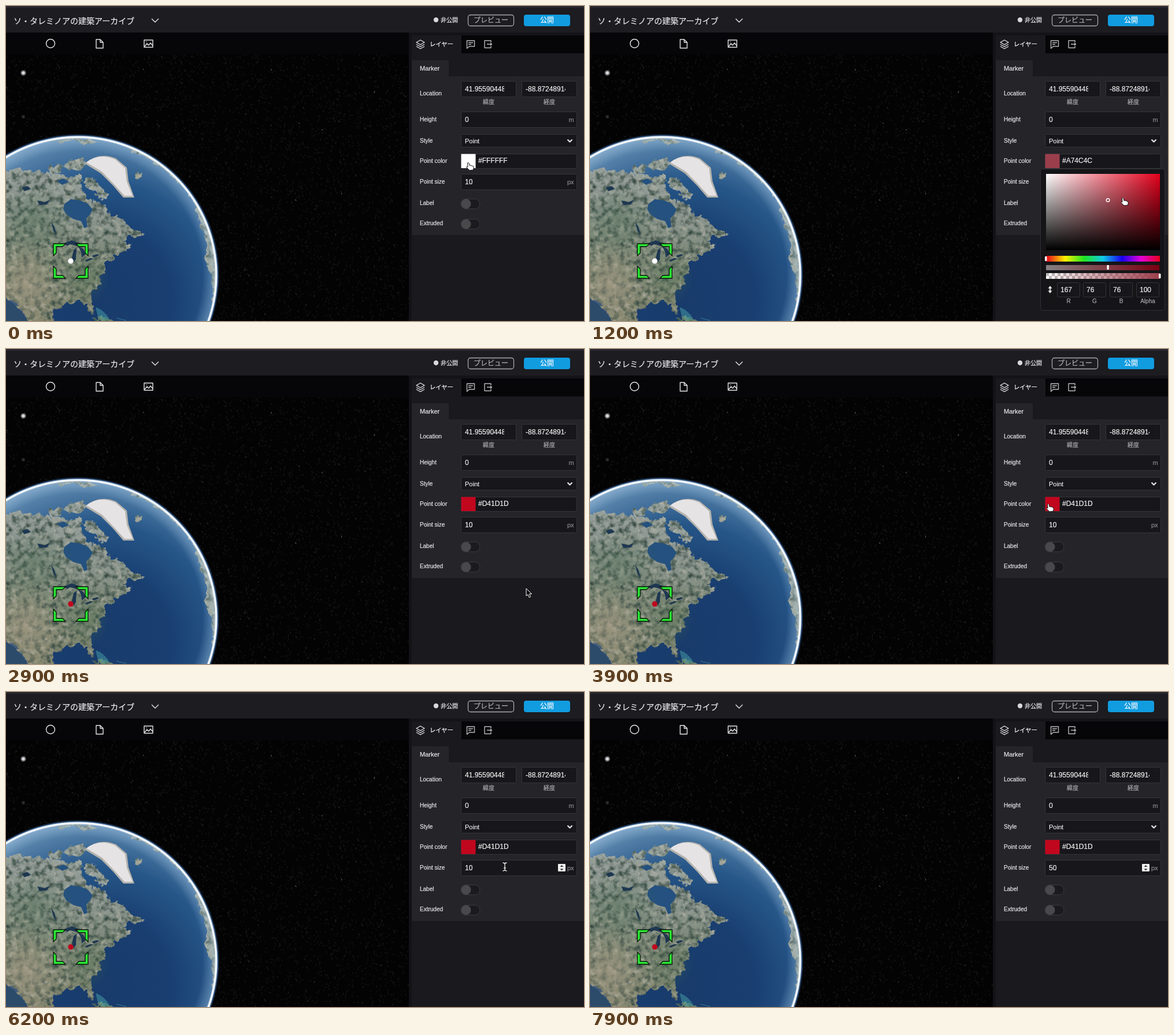
An HTML page for the animation above (8000 ms loop, 1000 by 546 pixels).

```html
<!DOCTYPE html>
<html lang="ja">
<head>
<meta charset="utf-8">
<title>Marker editor</title>
<style>
  html, body { margin: 0; width: 100%; height: 100%; overflow: hidden; background: #000; }
  svg { display: block; width: 100vw; height: 100vh; }
  text { font-family: "Liberation Sans", "Noto Sans CJK JP", "Noto Sans CJK", sans-serif; fill: #f2f2f4; stroke: #f2f2f4; stroke-width: .2; white-space: pre; }
  .line { fill: none; stroke: #e6e6e8; stroke-width: 1.4; stroke-linejoin: round; }
  .field { fill: #17171b; stroke: #34343a; }
  .ink { stroke: #111; stroke-linejoin: round; }
</style>
</head>
<body>
<svg viewBox="0 0 1000 546">
  <defs>
    <radialGradient id="ocean" gradientUnits="userSpaceOnUse" cx="160" cy="510" r="296">
      <stop offset="0" stop-color="#183b6b"/><stop offset=".42" stop-color="#193e70"/>
      <stop offset=".7" stop-color="#265688"/><stop offset="1" stop-color="#6791b5"/>
    </radialGradient>
    <linearGradient id="ground" gradientUnits="userSpaceOnUse" x1="120" y1="270" x2="70" y2="546">
      <stop offset="0" stop-color="#9aa39f"/><stop offset=".35" stop-color="#87928a"/>
      <stop offset=".62" stop-color="#7b8773"/><stop offset="1" stop-color="#85866f"/>
    </linearGradient>
    <radialGradient id="dry"><stop offset="0" stop-color="#a99d86" stop-opacity=".6"/><stop offset="1" stop-color="#a99d86" stop-opacity="0"/></radialGradient>
    <radialGradient id="woods"><stop offset="0" stop-color="#47684d" stop-opacity=".4"/><stop offset="1" stop-color="#47684d" stop-opacity="0"/></radialGradient>
    <radialGradient id="haze" gradientUnits="userSpaceOnUse" cx="124.5" cy="466.5" r="245">
      <stop offset=".88" stop-color="#b8d8f4" stop-opacity="0"/><stop offset=".965" stop-color="#b8d8f4" stop-opacity=".35"/>
      <stop offset=".973" stop-color="#fff"/><stop offset=".982" stop-color="#e4f1ff"/>
      <stop offset=".988" stop-color="#5c95dc" stop-opacity=".55"/><stop offset="1" stop-color="#1d4f94" stop-opacity="0"/>
    </radialGradient>
    <radialGradient id="glow"><stop offset=".3" stop-color="#dcdce2"/><stop offset="1" stop-color="#dcdce2" stop-opacity="0"/></radialGradient>
    <linearGradient id="sat"><stop stop-color="#fff"/><stop offset="1" stop-color="#e3001b"/></linearGradient>
    <linearGradient id="val" x2="0" y2="1"><stop stop-color="#000" stop-opacity="0"/><stop offset="1"/></linearGradient>
    <linearGradient id="hue"><stop stop-color="#e6001c"/><stop offset=".167" stop-color="#fff000"/><stop offset=".333" stop-color="#20e522"/><stop offset=".5" stop-color="#10c7e6"/><stop offset=".667" stop-color="#1800ee"/><stop offset=".833" stop-color="#e400d8"/><stop offset="1" stop-color="#e6001c"/></linearGradient>
    <linearGradient id="tone"><stop stop-color="#858082"/><stop offset="1" stop-color="#7a0010"/></linearGradient>
    <linearGradient id="alpha"><stop id="alphaFrom" stop-opacity="0"/><stop id="alphaTo" offset="1"/></linearGradient>
    <pattern id="check" patternUnits="userSpaceOnUse" x="789" y="463" width="10" height="10"><rect width="10" height="10" fill="#fff"/><path d="M0 0h5v5H0zM5 5h5v5H5z" fill="#bbb"/></pattern>
    <filter id="grain" x="0" y="0" width="100%" height="100%" color-interpolation-filters="sRGB">
      <feTurbulence type="fractalNoise" baseFrequency=".1" numOctaves="4" seed="8" result="noise"/>
      <feDisplacementMap in="SourceGraphic" in2="noise" scale="14" xChannelSelector="R" yChannelSelector="G" result="land"/>
      <feColorMatrix in="noise" values="0 0 0 0 .2  0 0 0 0 .28  0 0 0 0 .25  0 0 0 2.4 -1.05"/>
      <feComposite in2="land" operator="in" result="dark"/>
      <feColorMatrix in="noise" values="0 0 0 0 .72  0 0 0 0 .71  0 0 0 0 .66  0 0 2 0 -.95"/>
      <feComposite in2="land" operator="in" result="light"/>
      <feMerge><feMergeNode in="land"/><feMergeNode in="light"/><feMergeNode in="dark"/></feMerge>
    </filter>
    <clipPath id="disc"><circle cx="124.500" cy="466.500" r="240"/></clipPath>
    <clipPath id="view"><path d="M0 84H697V546H0z"/></clipPath>
    <clipPath id="coords"><path d="M788 130h74v28h-74zM893 130h75v28h-75z"/></clipPath>
  </defs>

  <rect width="1000" height="546" fill="#19191e"/>
  <g clip-path="url(#view)">
    <rect y="84" width="697" height="462" fill="#030303"/>
    <g id="stars" fill="none"/>
    <circle cx="30" cy="116" r="5.5" fill="url(#glow)"/>
    <circle cx="30" cy="192" r="4" fill="url(#glow)" opacity=".2"/>
    <g clip-path="url(#disc)">
      <circle cx="124.500" cy="466.500" r="240" fill="url(#ocean)"/>
      <g filter="url(#grain)">
        <path fill="url(#ground)" d="M-20 292L20 281 42 285 62 286 80 292 97 291 112 298 126 312 137 328 147 340 158 338 171 347 181 361 194 361 205 376 218 384 234 396 221 402 207 399 203 409 214 416 206 427 194 427 184 439 173 446 173 457 164 467 166 480 151 494 144 505 152 524 153 535 147 534 139 517 129 512 112 514 101 518 88 523 81 536 82 560H50L37 541 25 525 12 511 -20 500Z"/>
        <path fill="#98a29c" d="M72 282L87 272 99 276 94 288 79 293zM98 274L114 266 132 264 139 273 128 283 107 288zM136 296L154 300 164 314 175 323 174 336 161 331 153 322 139 314zM107 298L125 291 134 304 128 313 115 309z"/>
        <path fill="#99a092" d="M222 292L234 288 237 296 227 301zM75 235Q112 222 160 235L139 239 116 234zM202 238Q266 258 315 317L340 353 309 317 283 291 250 266 222 254zM324 334L341 353 356 383 371 445V500L357 512 356 473 344 437 346 405 337 379zM207 416L219 411 215 419 204 424zM226 389L237 393 232 399 222 398z"/>
        <path fill="#66846c" d="M147 541Q164 536 179 543L192 548 176 550z"/>
      </g>
      <path fill="#24517f" d="M101 343L112 335 128 337 142 343 150 353 145 362 139 368 141 383 135 385 130 373 116 369 104 361 99 352zM88 303l12-4 9 6-12 5z"/>
      <path fill="#b5b3ad" d="M136 273Q161 252 190 264L209 280 212 304 222 332 203 332 185 311 164 290z"/>
      <path fill="#e5e3e4" d="M139 271Q161 254 189 266L206 281 209 305 219 329 205 329 188 310 166 287z"/>
      <ellipse cx="35" cy="480" rx="60" ry="75" fill="url(#dry)"/>
      <ellipse cx="50" cy="370" rx="70" ry="60" fill="url(#woods)"/>
      <ellipse cx="137" cy="470" rx="42" ry="50" fill="url(#woods)"/>
      <path fill="#1e3751" d="M101 411l13-5 15 6-7 4-11-3-6 3zM117 423l5-4-1 20-4 5-3-8zM125 417l9 4 4 9-7 6-1-10zM136 441l10-4 5 1-11 5zM148 433l10-3 3 2-9 4zM78 374l6 9 4 15-6-9zM54 337l13 3 9-4-5 8-13 1zM27 315l10-3 6 5-11 4z"/>
      <path d="M156 523q14 5 22 19l-8 3-11-9zM191 541l17 4" fill="#479fa6" stroke="#51b7b5" opacity=".5"/>
      <path d="M0 507L13 516 26 530 38 546H0Z" fill="#2c4b6b"/>
    </g>
    <circle cx="124.500" cy="466.500" r="245" fill="url(#haze)"/>
    <circle id="marker" cx="112" cy="442" r="4.7"/>
    <g id="target" fill="#2bea35" stroke="#071307" stroke-width="1.3"/>
  </g>

  <rect width="1000" height="46" fill="#1c1c21"/><rect width="1000" height="3" fill="#29282f"/>
  <rect y="46" width="697" height="38" fill="#060608"/>
  <rect x="697" y="46" width="5" height="500" fill="#131317"/>
  <path d="M702 46h298v5H702z" fill="#141418"/>
  <path d="M788 51h212v31H788z" fill="#060608"/>
  <path d="M702 94h64v28h234v275H702z" fill="#242429"/>
  <path class="line" d="M252 22l6 6 6-6"/>
  <circle cx="744" cy="24" r="4.2" fill="#d8d8da"/>
  <rect x="799.5" y="15.5" width="79" height="19" rx="4" fill="none" stroke="#a9a9ad" stroke-width="1.3"/>
  <rect x="896" y="15" width="80" height="20" rx="4" fill="#119ce0"/>
  <g class="line">
    <circle cx="77" cy="65" r="7.5"/>
    <path d="M156 58h7l5 5v10h-12zM163 58v5h5M239 59h15v12.500h-15zM240 70l4-5 3 3 3-4 4 5M243 62h1"/>
    <path d="M717 59l7 4-7 4-7-4zM710 66.500l7 4 7-4M710 70l7 4 7-4"/>
    <path d="M797.500 60h13v10h-9l-4 3.500zM800 63.500h8M800 66.500h5M839 63v-3h-11v12.500h11v-3M832 66.300h8M838 64l2.500 2.300-2.500 2.300" stroke="#b8b8bc"/>
  </g>
  <g id="fields"/>
  <g id="labels"/>
  <path d="M971.500 231.500l4 4 4-4" class="line" style="stroke-width:2.2"/>
  <g fill="#1b1b1f" stroke="#3b3b40"><rect x="787" y="334.500" width="33" height="17" rx="8.500"/><rect x="787" y="369.500" width="33" height="17" rx="8.500"/></g>
  <g fill="#49494c"><circle cx="796" cy="343" r="8.500"/><circle cx="796" cy="378" r="8.500"/></g>
  <rect id="swatch" x="787.500" y="256.500" width="25" height="24.500"/>
  <text id="hex" x="817" y="272" font-size="12"/>
  <text id="size" x="794" y="309" font-size="12"/>
  <path id="caret" d="M0 298v14" stroke="#f2f2f2"/>
  <g id="spinner"><rect x="955" y="298" width="13" height="13" rx="1" fill="#f0f0f0"/><path d="M958.500 303l3-3 3 3zM958.500 306.500l3 3 3-3z" fill="#333"/></g>

  <g id="picker">
    <rect x="779.500" y="282.500" width="215" height="245" rx="4" fill="#151518" stroke="#303035"/>
    <rect x="789" y="291" width="197" height="132" fill="url(#sat)"/><rect x="789" y="291" width="197" height="132" fill="url(#val)"/>
    <rect x="789" y="433" width="197" height="10" rx="1" fill="url(#hue)"/>
    <rect x="789" y="449" width="196" height="9" rx="1" fill="url(#tone)"/>
    <rect x="789" y="463" width="197" height="10" fill="url(#check)"/><rect x="789" y="463" width="197" height="10" fill="url(#alpha)"/>
    <g fill="#fff"><rect x="787" y="434" width="3.500" height="8" rx="1"/><rect id="toneKnob" y="449" width="3.500" height="8" rx="1"/><rect x="984" y="464" width="3.500" height="8" rx="1"/></g>
    <circle id="thumb" r="2.800" fill="none" stroke="#fff" stroke-width="1.400"/>
    <path d="M796 487v9" stroke="#eee" stroke-width="1.800"/><path d="M792.500 489.500l3.500-4.500 3.500 4.500zM792.500 493.500l3.500 4.500 3.500-4.500z" fill="#eee"/>
    <g id="channels"/>
  </g>

  <g id="cursor">
    <path id="hand" class="ink" fill="#fff" d="M-1.500 0q1.500-1.500 2.500.5l1 4 1.500-.6 1 1 1.700-.3.900 1.100 1.500.1q1.200 2.200 0 6.200l-6.500 1-5.500-5.500q-.4-2 2.400-.5z"/>
    <path id="arrow" fill="#0b0b0b" stroke="#fff" d="M0 0v13l3-2.500 2 5 2.500-1-2-5h4z"/>
    <path id="beam" fill="none" stroke="#e8e8e8" stroke-width="1.300" d="M-3.500-7q3 0 3.500 2 .5-2 3.500-2M0-5v10M-3.500 7q3 0 3.500-2 .5 2 3.500 2M-2 2h4"/>
  </g>
</svg>
<script>
const $ = id => document.getElementById(id);
const set = (id, attrs) => { for (const k in attrs) $(id).setAttribute(k, attrs[k]); };
const show = (id, on) => set(id, { visibility: on ? 'inherit' : 'hidden' });
const label = (s, x, y, size = 10, fill = '#ececee', more = '') =>
  `<text x="${x}" y="${y}" font-size="${size}" style="fill:${fill};stroke:${fill}" ${more}>${s}</text>`;
const field = (x, y, w, h) => `<rect class="field" x="${x + .5}" y="${y + .5}" width="${w - 1}" height="${h - 1}" rx="2"/>`;
const MID = 'text-anchor="middle"', CLIP = 'clip-path="url(#coords)"';

let seed = 7;
const random = () => (seed = seed * 16807 % 2147483647) / 2147483647;
const specks = n => Array.from({ length: n }, () =>
  `M${(random() * 696).toFixed(1)} ${(84 + random() * 462).toFixed(1)}l${(random() * 3 - 1).toFixed(1)} ${(random() * 2.5).toFixed(1)}`).join('');
$('stars').innerHTML = [[4200, '#111', 1.6], [600, '#1b1b1b', 1.3], [80, '#303030', 1.2], [14, '#606060', 1.2]]
  .map(([n, c, w]) => `<path d="${specks(n)}" stroke="${c}" stroke-width="${w}" stroke-linecap="round"/>`).join('');

$('target').innerHTML = [[1, 1], [-1, 1], [1, -1], [-1, -1]].map(([x, y]) =>
  `<path transform="translate(112 442) scale(${x} ${y})" d="M-30-30h21l-5 5h-11v11l-5 5z"/>`).join('');

$('fields').innerHTML = field(787, 130, 96, 28) + field(892, 130, 96, 28) + field(787, 183, 201, 28) +
  field(787, 222, 201, 23) + field(787, 256, 201, 26) + field(787, 291, 201, 28);

$('labels').innerHTML =
  label('ソ・タレミノアの建築アーカイブ', 13, 30.5, 14) + label('非公開', 752, 28) +
  label('プレビュー', 839, 28.5, 12, '#b4b4b8', MID) + label('公開', 936, 28.5, 12, '#fff', MID) +
  label('レイヤー', 733, 70, 10.3, '#fff') + label('Marker', 716, 112, 11) +
  [['Location', 155], ['Height', 200], ['Style', 237], ['Point color', 272], ['Point size', 308], ['Label', 345], ['Extruded', 380]]
    .map(([s, y]) => label(s, 716, y)).join('') +
  label('41.95590448', 794, 148, 12, '#f2f2f2', CLIP) + label('-88.87248914', 899, 148, 12, '#f2f2f2', CLIP) +
  label('緯度', 835, 170, 10, '#aaaaae', MID) + label('経度', 940, 170, 10, '#aaaaae', MID) +
  label('0', 794, 201, 12) + label('Point', 794, 237.5, 11) +
  label('m', 973.5, 201, 11, '#8c8c90') + label('px', 971, 309, 11, '#8c8c90');

$('channels').innerHTML = [['R', 808], ['G', 853], ['B', 899], ['Alpha', 945]].map(([s, x], i) =>
  field(x, 479, 40, 26) + `<text id="channel${i}" x="${x + 6}" y="496" font-size="12"/>` +
  label(s, x + 20, 515, 10, '#aaaaae', MID)).join('');

// time, x, y
const cursorPath = [[0, 800, 272], [300, 800, 272], [900, 892, 337], [1000, 898, 337], [1200, 922, 333], [1800, 963, 310],
  [2000, 963, 310], [2300, 959, 313], [2600, 925, 425], [2900, 900, 415], [3300, 835, 302], [3600, 796, 270], [3900, 793, 269],
  [4500, 797, 271], [4800, 801, 307], [5600, 801, 307], [6100, 863, 303], [8000, 863, 303]];
const thumbPath = [[0, 789, 291], [900, 789, 291], [1000, 880, 337], [1200, 896, 336.6], [1800, 962.5, 310.2],
  [2000, 962.5, 310.2], [2300, 959, 313.3], [8000, 959, 313.3]];

function along(path, t) {
  const i = path.findIndex(p => p[0] > t);
  const [a, b] = [path[i - 1], path[i]];
  const u = (t - a[0]) / (b[0] - a[0]), e = u * u * (3 - 2 * u);
  return [a[1] + (b[1] - a[1]) * e, a[2] + (b[2] - a[2]) * e];
}

function draw(t) {
  const open = t >= 400 && t < 2600;
  const [tx, ty] = along(thumbPath, t);
  const s = (tx - 789) / 197, v = 1 - (ty - 291) / 132;
  const r = Math.round(255 * v), g = Math.round(255 * v * (1 - s));
  const hex = n => n.toString(16).padStart(2, '0').toUpperCase();
  const color = `rgb(${Math.round(r - 22 * s)},${Math.max(0, Math.round(g - 26 * s))},${g})`;

  $('hex').textContent = '#' + hex(r) + hex(g) + hex(g);
  [r, g, g, 100].forEach((n, i) => $('channel' + i).textContent = n);
  set('swatch', { fill: color });
  set('alphaFrom', { 'stop-color': color });
  set('alphaTo', { 'stop-color': color });
  set('thumb', { cx: tx, cy: ty });
  set('toneKnob', { x: tx - 1.7 });
  set('marker', { fill: t < 2600 ? '#fff' : color });
  show('picker', open);

  const [cx, cy] = along(cursorPath, t);
  const overSize = !open && cy > 291 && cy < 319;
  const kind = overSize ? 'beam' : t < 1700 || t >= 3400 ? 'hand' : 'arrow';
  for (const k of ['hand', 'arrow', 'beam']) show(k, k === kind);
  set('cursor', { transform: `translate(${cx.toFixed(1)} ${cy.toFixed(1)})` });
  show('cursor', t < 6400);
  show('spinner', overSize);

  const erased = t >= 6400 && t < 6700;
  $('size').textContent = t < 6400 ? '10' : erased ? '0' : '50';
  set('caret', { transform: `translate(${erased ? 794.5 : 801.5} 0)` });
  show('caret', t >= 5600 && t < 6100 || t >= 6400 && t < 7500);
}

let last = -1;
function tick(now) {
  const step = Math.floor(now % 8000 / 100);
  if (step !== last) draw((last = step) * 100);
  requestAnimationFrame(tick);
}
draw(0);
requestAnimationFrame(tick);
</script>
</body>
</html>
```
